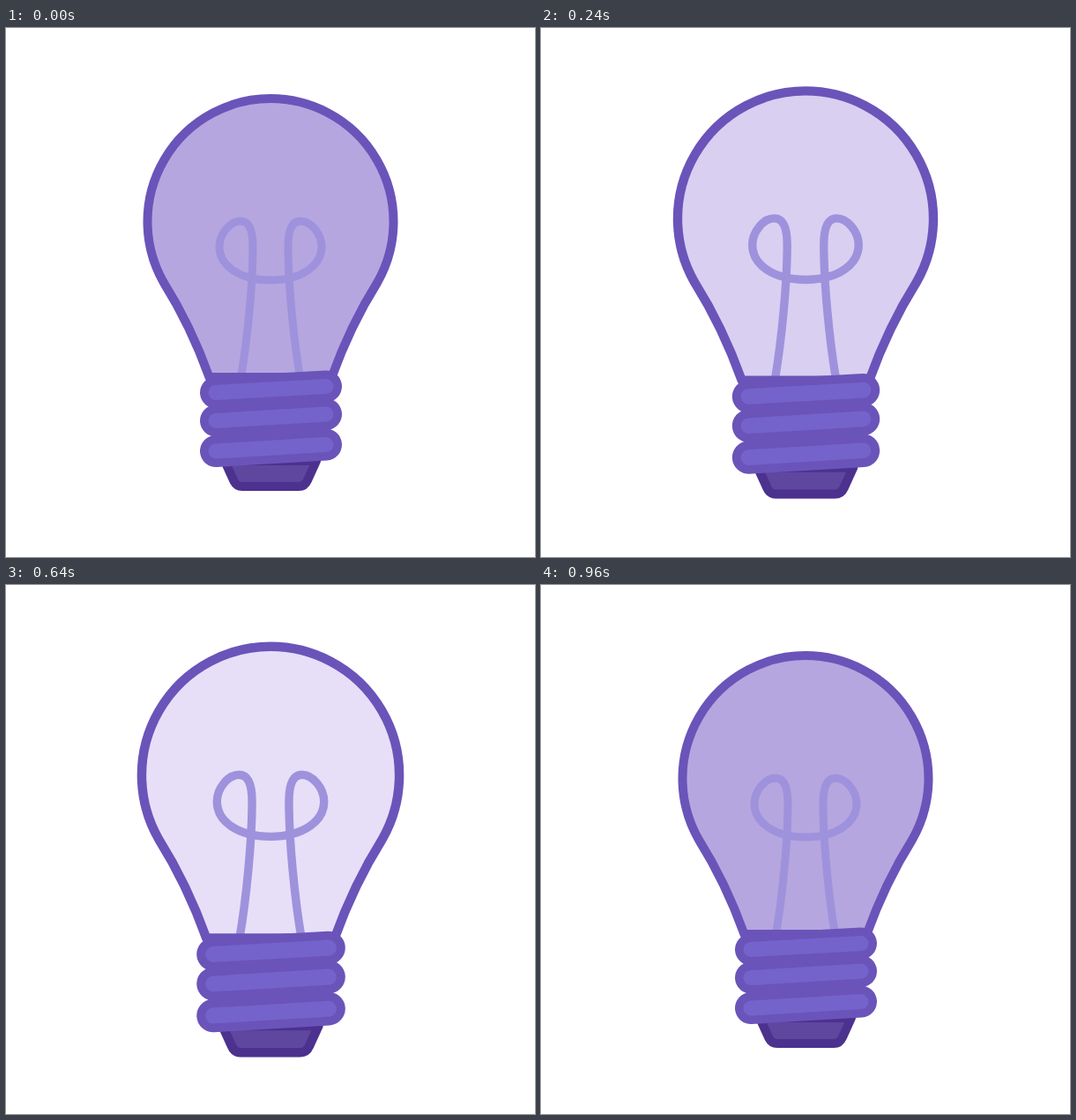
These frames come from a looping animation (600x600 px, 1.4 s). An HTML page:

```html
<!DOCTYPE html>
<html lang="en">
<head>
<meta charset="utf-8">
<title>Light bulb</title>
<style>
  html, body { margin: 0; width: 100%; height: 100%; overflow: hidden; background: #fff; }
  svg { display: block; width: 100%; height: 100%; }
</style>
</head>
<body>
<svg viewBox="0 0 600 600" fill="none" stroke-linecap="round" stroke-linejoin="round">
  <g id="bulb">
    <path id="glass" d="M230.5 396C219 364 201 324 179 289A139.5 139.5 0 1 1 421 289C399 324 381 364 369.5 396Z"/>
    <path stroke="#9f92dc" stroke-width="9" d="M266.5 396C274 352 280 290 280 248C280 228 275 219 266 219C254 219 242 234 242 248C242 269 264 286 300 286C336 286 358 269 358 248C358 234 346 219 334 219C325 219 320 228 320 248C320 290 326 352 333.5 396"/>
    <use href="#glass" stroke="#6a54b9" stroke-width="10"/>
    <path fill="#5f469f" stroke="#4c318f" stroke-width="10" d="M248 491L258 513Q261 520 268 520H332Q339 520 342 513L352 491Z"/>
    <path id="thread" stroke="#6a54b9" stroke-width="36" d="M238 413.5L363 406.5M238 445.5L363 438M238 480L363 472.5"/>
    <use href="#thread" id="shine"/>
  </g>
</svg>
<script>
const LOOP = 1400, STEP = 40;
const bulb = document.getElementById('bulb');
const glass = document.getElementById('glass');
const thread = document.getElementById('thread');

// The highlight reuses the thread path with a thinner, lighter stroke.
const shine = thread.cloneNode();
shine.removeAttribute('id');
shine.setAttribute('stroke', '#7563cc');
shine.setAttribute('stroke-width', 17);
document.getElementById('shine').replaceWith(shine);

const dim = [181, 166, 224], lit = [238, 231, 250];
const times = [0, 160, 360, 520, 560, 720, 800, 960, LOOP];
const growth = [0, .46, .92, 1, 1, .5, .26, 0, 0];
const glow = [0, .42, .89, 1, 1, .65, .42, 0, 0];

// Smooth curve through the keys, flat wherever the direction turns.
function curve(keys, t) {
  const slope = i => (keys[i + 1] - keys[i]) / (times[i + 1] - times[i]);
  const tangent = i => {
    if (i === 0) return slope(0);
    if (i === times.length - 1) return 0;
    const a = slope(i - 1), b = slope(i);
    return a * b > 0 ? 2 * a * b / (a + b) : 0;
  };
  const i = times.findIndex((k, n) => t >= k && t < times[n + 1]);
  const span = times[i + 1] - times[i], u = (t - times[i]) / span, v = 1 - u;
  return keys[i] * v * v * (1 + 2 * u) + keys[i + 1] * u * u * (3 - 2 * u)
    + span * u * v * (tangent(i) * v - tangent(i + 1) * u);
}

const start = performance.now();
function draw(now) {
  const t = Math.floor(Math.max(0, now - start) % LOOP / STEP) * STEP;
  const scale = 1 + .058 * curve(growth, t);
  const light = curve(glow, t);
  bulb.setAttribute('transform', `translate(300 300) scale(${scale}) translate(-300 -300)`);
  // Only the bottom copy is painted; the outline copy hides its fill.
  glassFill.setAttribute('fill', `rgb(${dim.map((c, i) => Math.round(c + (lit[i] - c) * light))})`);
  requestAnimationFrame(draw);
}

// Separate the painted glass from its outline.
const glassFill = glass;
const outline = glass.cloneNode();
outline.removeAttribute('id');
outline.setAttribute('stroke', '#6a54b9');
outline.setAttribute('stroke-width', 10);
bulb.querySelector('use').replaceWith(outline);

draw(start);
</script>
</body>
</html>
```
